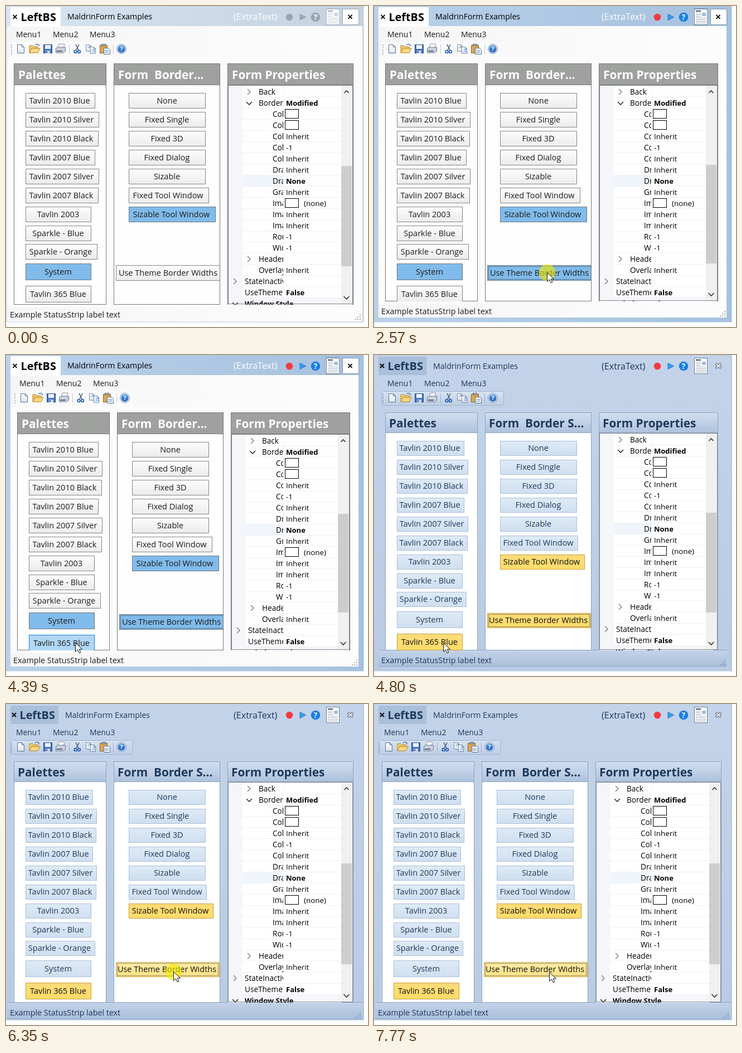
Write an HTML page that moves like this. It is 649 px wide and 576 px high and loops after 8520 ms.

```html
<!DOCTYPE html>
<html lang="en">
<head>
<meta charset="utf-8">
<style>
html, body { margin: 0; width: 100%; height: 100%; overflow: hidden; background: #fff; }
svg { display: block; }
text { font-family: "Open Sans", "Noto Sans", sans-serif; white-space: pre; }
</style>
</head>
<body>
<svg width="649" height="576" viewBox="0 0 649 576">
  <defs id="defs"></defs>
  <g id="ui"></g>
  <circle id="ring" r="15" fill="#f4ea00" fill-opacity=".62"/>
  <path id="cursor" d="M0 0V16L4 12.4L6.6 18.3L9.3 17.1L6.8 11.4H12Z" fill="#fff" stroke="#111" stroke-width="1"/>
</svg>
<script>
const LOOP = 8520;
const STEP = 70;
const $ = id => document.getElementById(id);

const gradient = (id, a, b, across) =>
  `<linearGradient id="${id}" x2="${across ? 1 : 0}" y2="${across ? 0 : 1}"><stop stop-color="${a}"/><stop offset="1" stop-color="${b}"/></linearGradient>`;
$('defs').innerHTML = [
  ['capActive', '#b9d1ea', '#a6c1de', 1], ['capIdle', '#d7e4f2', '#c4d2e0', 1],
  ['sysBack', '#f5f5f5', '#fdfdfd', 1], ['sysBtn', '#fdfdfd', '#ebebeb'],
  ['blueBtn', '#deeaf6', '#cfdff0'], ['blueHead', '#d2dff0', '#adc1dc'],
  ['goldBtn', '#ffdb78', '#ffdc68'], ['paleGold', '#ffeca6', '#ffe285'], ['hotGold', '#fce775', '#fde05c'],
  ['blueBack', '#c3d3e9', '#b9cbe3'], ['blueBar', '#d9e4f2', '#bccde3'], ['blueStatus', '#c4d3e8', '#aabfdb'],
  ['paper', '#ffffff', '#dbe6f4'], ['sky', '#5c9ee8', '#1c5fb8']
].map(g => gradient(...g)).join('');

// button looks: fill, border, text
const SYSTEM = {
  head: '#9fa19f', headText: '#fff', edge: '#767876', text: '#1c1c1c', panel: '#fefefe',
  btn: ['url(#sysBtn)', '#858585', '#1c1c1c'], hover: ['#b0d7f4', '#1a82d8', '#1c1c1c'], on: ['#80bbeb', '#707880', '#1c1c1c'],
  dy: 0, pad: 0, height: 28
};
SYSTEM.hot = SYSTEM.down = SYSTEM.on;
const BLUE = {
  head: 'url(#blueHead)', headText: '#1e395b', edge: '#8ea4c1', text: '#1e395b', panel: '#fff',
  btn: ['url(#blueBtn)', '#abbfd8', '#1e395b'], hover: ['url(#paleGold)', '#c9a94a', '#111'], on: ['url(#goldBtn)', '#c2a04a', '#111'],
  hot: ['url(#hotGold)', '#b49a48', '#111'], down: ['url(#paleGold)', '#b9783a', '#111'],
  dy: -2, pad: 4, height: 27
};

const PALETTES = [
  ['Tavlin 2010 Blue', 156, 125], ['Tavlin 2010 Silver', 190, 132], ['Tavlin 2010 Black', 224, 131],
  ['Tavlin 2007 Blue', 258, 125], ['Tavlin 2007 Silver', 292, 132], ['Tavlin 2007 Black', 326, 131],
  ['Tavlin 2003', 360, 118], ['Sparkle - Blue', 394, 118], ['Sparkle - Orange', 427, 129],
  ['System', 462, 118], ['Tavlin 365 Blue', 502, 118]
];
const BORDERS = [
  ['None', 156, 138], ['Fixed Single', 190, 138], ['Fixed 3D', 224, 138], ['Fixed Dialog', 258, 138],
  ['Sizable', 292, 138], ['Fixed Tool Window', 326, 144], ['Sizable Tool Window', 360, 156]
];
// name, value, indent level, expander
const PROPS = [
  ['Back', '', 1, '>'], ['Border', '*Modified', 1, 'v'], ['Color1', '#', 2], ['Color2', '#', 2],
  ['ColorAlign', 'Inherit', 2], ['ColorAngle', '-1', 2], ['ColorStyle', 'Inherit', 2], ['Draw', 'Inherit', 2],
  ['DrawBorders', '*None', 2], ['GraphicsHint', 'Inherit', 2], ['Image', '#(none)', 2], ['ImageAlign', 'Inherit', 2],
  ['ImageStyle', 'Inherit', 2], ['Rounding', '-1', 2], ['Width', '-1', 2], ['Header', '', 1, '>'],
  ['OverlayHeaders', 'Inherit', 1], ['StateInactive', '', 0, '>'], ['UseThemeForm', '*False', 0], ['*Window Style', '', 0, 'v']
];

const rect = (x, y, w, h, fill, stroke = 'none', extra = '') =>
  `<rect x="${x}" y="${y}" width="${w}" height="${h}" fill="${fill}" stroke="${stroke}" ${extra}/>`;
const box = (x, y, w, h, fill, stroke, extra) => rect(x + .5, y + .5, w - 1, h - 1, fill, stroke, extra);
const line = (d, color, width = 1, fill = 'none') =>
  `<path d="${d}" fill="${fill}" stroke="${color}" stroke-width="${width}"/>`;
const text = (x, y, s, size, fill, extra = '') =>
  `<text x="${x}" y="${y}" font-size="${size}" fill="${fill}" ${extra}>${s}</text>`;
const clip = (x, y, w, h, body) =>
  `<svg x="${x}" y="${y}" width="${w}" height="${h}" viewBox="${x} ${y} ${w} ${h}">${body}</svg>`;
const move = (x, y, body) => `<g transform="translate(${x} ${y})">${body}</g>`;
const BOLD = 'font-weight="700"';

function button(theme, [label, y, w], x, look, focus) {
  const [fill, stroke, ink] = theme[look];
  const fits = w !== 118 && w !== 138;
  const width = w - (fits ? theme.pad : 0);
  const h = y > 461 && w === 118 ? 30 : theme.height;
  const top = y + theme.dy;
  return box(x, top, width, h, fill, stroke) +
    (focus ? box(x + 2, top + 2, width - 4, h - 4, 'none', '#333', 'stroke-dasharray="1 1"') : '') +
    text(x + width / 2 - (fits ? 1.5 : .5), top + Math.floor(h / 2) + 5, label, 14.5, ink, 'text-anchor="middle"');
}

function panel(theme, x, w, bottom, title, body) {
  const headH = 38 + theme.dy;
  return box(x, 103, w, bottom - 102, theme.panel, theme.edge) +
    clip(x + 1, 104, w - 2, bottom - 103, body) +
    box(x, 103, w, headH + 1, theme.head, theme.edge) +
    text(x + (theme === BLUE ? 7 : 8), 131 + theme.dy / 2, title, 20.8, theme.headText, BOLD);
}

function helpIcon(x, y, r, fill) {
  return `<circle cx="${x}" cy="${y}" r="${r}" fill="${fill}"/>` +
    text(x, y + r * .6, '?', r * 1.65, '#fff', BOLD + ' text-anchor="middle"');
}

const sheet = (x, y) => line(`M${x} ${y}h8l4 4v11h-12zM${x + 8} ${y}v4h4`, '#5b6f8d', 1, 'url(#paper)');

function toolbar(blue) {
  let s = blue ? rect(7.5, 65.5, 219, 25, 'url(#blueBar)', '#a1b5d0', 'rx="3"') : rect(7, 64, 215, 28, '#fafafa', 'none', 'rx="3"');
  for (let y = 69; y < 86; y += 4) s += rect(9, y, 2, 2, blue ? '#7f97b8' : '#b4b4b4');
  s += sheet(20.5, 69.5);
  s += line('M42 83V71h6l2 2h7v10z', '#b58a35', 1, '#f0c970') + line('M42 84l4-8h15l-4 8z', '#b57c20', 1, '#fbd982') + line('M52 70q5-4 8 2', '#3c6fb0', 1.4);
  s += box(67, 69, 16, 16, '#4172c4', '#284a91') + rect(70, 70, 10, 7, '#eef4fc') + rect(71, 80, 8, 5, '#c9d6e8') + rect(72, 81, 2, 3, '#284a91');
  s += line('M93 75l2-7h10l-2 7z', '#8893a3', 1, '#fff') + line('M89.500 76l3-2h14v7l-4 3h-13z', '#68758a', 1, '#cbd3de') + line('M91 81h10', '#566274', 2);
  s += line('M113.500 69v17M192.500 69v17', blue ? '#9bb0cc' : '#c9c9c9');
  s += line('M125 69l5 10M131 69l-5 10', '#51607a', 1.6) + '<g fill="none" stroke="#2563b8" stroke-width="1.8"><circle cx="124.500" cy="82" r="2.300"/><circle cx="131" cy="82" r="2.300"/></g>';
  s += move(143.5, 69.5, '<g transform="scale(.78)">' + sheet(0, 0) + sheet(10, 5) + '</g>') + line('M146 74h5M155 78h5M155 81h5', '#4d83ca');
  s += box(168, 70, 14, 15, '#dda751', '#8f6427') + box(171, 68, 8, 4, '#a9b1bd', '#626b78') + line('M175.500 75.500h8l3 3v8h-11z', '#5b6f8d', 1, '#f2f6fd') + line('M177 80h7M177 83h7', '#4d83ca');
  return s + '<circle cx="207" cy="77" r="8.500" fill="#d9e5f4" stroke="#7d99bd"/>' + helpIcon(207, 77, 6.6, 'url(#sky)');
}

function pageIcon(active) {
  let s = box(574, 5, 24, 29, '#fff', active ? '#6f7c8d' : '#a7afb8');
  for (let y = 12; y < 31; y += 3) s += rect(577, y, y < 20 ? 9 : 18, 1, active ? '#a3abb6' : '#c6cbd1');
  return s + rect(577, 8, 9, 2, active ? '#3f4b5c' : '#99a1aa') + rect(588, 12, 7, 6, active ? '#9dbfe2' : '#cfd6dd');
}

function caption(blue, active) {
  const ink = blue ? '#1e395b' : '#000';
  const gray = '#9ba5af';
  let s = blue ? rect(8, 3, 86, 33, '#a9bfda') : rect(8, 2, 90, 35, '#fff');
  s += blue ? line('M11 16l7 7M18 16l-7 7', '#111', 2.2) : line('M12.500 16l7 7M19.500 16l-7 7', '#111', 1.8);
  s += text(blue ? 24.5 : 26.5, 27, 'LeftBS', 19.8, ink, BOLD);
  s += text(blue ? 106 : 110, blue ? 25 : 24, 'MaldrinForm Examples', 14.1, ink);
  s += text(408, blue ? 26 : 25, '(ExtraText)', 16.1, blue ? ink : '#fff');
  s += `<circle cx="508" cy="20" r="6.300" fill="${active ? '#f23a43' : gray}"/>`;
  s += line('M527 14.500v11l10.500-5.500z', active ? '#1c78d8' : gray, 1, active ? '#399af2' : gray);
  s += helpIcon(555, 20, 8.3, active ? '#1680e6' : gray);
  if (!blue) s += box(572, 4, 28, 31, active ? '#dbe8f6' : '#e5edf6', active ? '#8da9c8' : '#b8c6d5');
  s += pageIcon(active);
  return s + (blue
    ? line('M613 15.500l9 8M622 15.500l-9 8', '#45566d', 4) + line('M613.500 16l8 7M621.500 16l-8 7', '#fff', 2)
    : box(603, 5, 30, 29, '#fff', active ? '#7f96ae' : '#a0aab4') + line('M613.500 16l7 7M620.500 16l-7 7', '#111', 1.8));
}

function chevron(x, y, kind) {
  const d = { '>': 'm-3-5l5 5l-5 5', v: 'm-5-2l5 5l5-5', '^': 'm-4 2l4-4l4 4' }[kind];
  return line(`M${x} ${y}${d}`, kind === '>' ? '#8a8a8a' : '#333', 1.6);
}

function grid(theme, d, bottom) {
  const dy = theme.dy;
  let s = rect(398 + d, 142 + dy, 26, 400, '#f4f6fa');
  let names = '';
  PROPS.forEach(([name, value, level, expander], i) => {
    const y = 154 + dy + i * 20;
    const heading = name[0] === '*';
    if (heading) s += rect(398 + d, y - 10, 204, 20, '#f4f6fa');
    if (i === 8) s += rect(424 + d, y - 10, 73 - d, 20, '#f0f5fb');
    s += rect(424 + d, y + 9, 177 - 2 * d, 1, '#f0f1f4');
    names += text(428 + d + level * 25, y + 5, name.replace('*', ''), heading ? 13 : 13.6, '#000', heading ? BOLD : '');
    if (expander) s += chevron((level ? 436 : 411) + d, y, expander);
    if (value[0] === '#') s += box(500, y - 9, 25, 17, '#fff', '#000');
    const strong = value[0] === '*';
    s += text(value[0] === '#' ? 534 : 502, y + 5, value.replace(/[#*]/, ''), strong ? 13 : 13.4, '#000', strong ? BOLD : '');
  });
  s += rect(497, 142, 1, 382, '#f3f4f6') + clip(398, 142 + dy, 99, 400, names);
  // the bold section heading runs past the name column
  s += clip(497, 522, 60, 20, text(428 + d, 539 + dy, 'Window Style', 13, '#000', BOLD));
  const x = 601 - d;
  const thumb = (d ? 285 : 287) + (dy && (d ? -2 : -1));
  return s + rect(x, 142 + dy, 20, bottom - 140, '#f0f0f0') + rect(x, thumb, 19, (d ? 462 : 467) - thumb, '#cdcdcd') +
    chevron(x + 9.5, 154 + dy, '^') + chevron(x + 9.5, bottom - 12, 'v') +
    box(398 + d, 142 + dy, 224 - 2 * d, bottom - 142 - dy, 'none', '#828790');
}

function draw({ blue, wide, active, hover, pressed }) {
  const theme = blue ? BLUE : SYSTEM;
  const d = wide ? 6 : 0;
  const left = 2 + d, right = 639 - d - (wide ? 1 : 0), bottom = 535 - d;
  const statusY = 541 - d, end = wide ? 559 : 566;
  const frame = blue ? 'url(#blueBack)' : active ? 'url(#capActive)' : 'url(#capIdle)';
  let s = rect(0, 0, 641.5, 567.5, frame);
  if (!blue) {
    s += rect(left, 36, right - left, end - 36, '#fbfbfb') + rect(left, 36, right - left, 56, 'url(#sysBack)') +
      rect(left, statusY, right - left, end - statusY, 'url(#sysBack)');
  } else {
    s += rect(left, statusY - 6, right - left, end - statusY + 6, 'url(#blueStatus)') +
      line(`M${left} ${statusY - 5.5}H${right}M${left} ${end - .5}H${right}`, '#8ca5c6') + line('M641 0V568', '#a4b8d2');
  }
  s += caption(blue, active);
  ['Menu1', 'Menu2', 'Menu3'].forEach((m, i) => s += text(18 + d + i * 66, 56, m, 13.9, theme.text));
  s += move(d, 0, toolbar(blue));

  const current = blue ? 'Tavlin 365 Blue' : 'System';
  const look = name => name === current ? 'on' : name === hover ? 'hover' : 'btn';
  s += panel(theme, 14 + d, 166, bottom, 'Palettes',
    PALETTES.map(b => button(theme, b, 35 + d, look(b[0]))).join(''));

  const over = hover === 'use';
  const useLook = wide ? (over ? (pressed ? 'down' : 'hot') : 'on') : over ? 'hover' : 'btn';
  s += panel(theme, 193 + d, 191, bottom, blue ? 'Form  Border S...' : 'Form  Border...',
    BORDERS.map((b, i) => button(theme, b, 220 + d, i === 6 ? 'on' : 'btn')).join('') +
    button(theme, ['Use Theme Border Widths', 465, 190], 197 + d, useLook, active && (blue || wide)));

  s += panel(theme, 397 + d, 226 - 2 * d, bottom, 'Form Properties', grid(theme, d, bottom));
  s += text(7 + d, 559 - d, 'Example StatusStrip label text', 14.3, theme.text);
  for (let r = 0; r < 3; r++) for (let c = 0; c <= r; c++)
    s += rect(634 - d - c * 4, 553 - d + r * 4, 2, 2, blue ? '#7c93b3' : '#a9a9a9');
  return s;
}

// start, end, points the pointer passes through
const MOVES = [
  [330, 1030, [[557, 564], [440, 478], [345, 448], [310, 478]]],
  [4110, 4390, [[264, 487], [124, 516]]],
  [4870, 5150, [[160, 509], [300, 480]]],
  [6490, 6760, [[300, 480], [302, 482]]],
  [7490, 7770, [[302, 482], [314, 481]]]
];
const CLICKS = [[1420, 1560], [2570, 2700], [3560, 3760], [4660, 4800], [5610, 5870], [6350, 6620], [7360, 7630]];
const TOGGLES = [1490, 2700, 3690, 5740, 6490, 7490];

function pointer(t) {
  const m = MOVES.filter(m => t >= m[0]).pop();
  if (!m) return [700, 700];
  const [start, end, pts] = m;
  const p = Math.min(1, Math.floor((t - start) / STEP) / Math.floor((end - start) / STEP));
  const at = p * (pts.length - 1);
  const i = Math.min(pts.length - 2, Math.floor(at));
  return [0, 1].map(k => pts[i][k] + (pts[i + 1][k] - pts[i][k]) * (at - i));
}

let shown = '';
function render(t) {
  const [x, y] = pointer(t);
  const wide = TOGGLES.filter(c => t >= c).length % 2 === 1;
  const pressed = CLICKS.some(c => t >= c[0] && t < c[1]);
  const hover = x > 197 && x < 384 && y > 463 && y < 493 ? 'use' : x < 160 && y > 500 ? 'Tavlin 365 Blue' : '';
  const state = { blue: t >= 4730, wide, active: t >= 1420, hover, pressed };
  const key = JSON.stringify(state);
  if (key !== shown) {
    $('ui').innerHTML = draw(state);
    shown = key;
  }
  const place = `translate(${Math.round(x) + .5} ${Math.round(y) + .5})`;
  $('cursor').setAttribute('transform', place);
  $('ring').setAttribute('transform', place);
  $('ring').setAttribute('visibility', pressed ? 'visible' : 'hidden');
}

const began = performance.now();
function tick() {
  render((performance.now() - began) % LOOP);
  requestAnimationFrame(tick);
}
tick();
</script>
</body>
</html>
```
